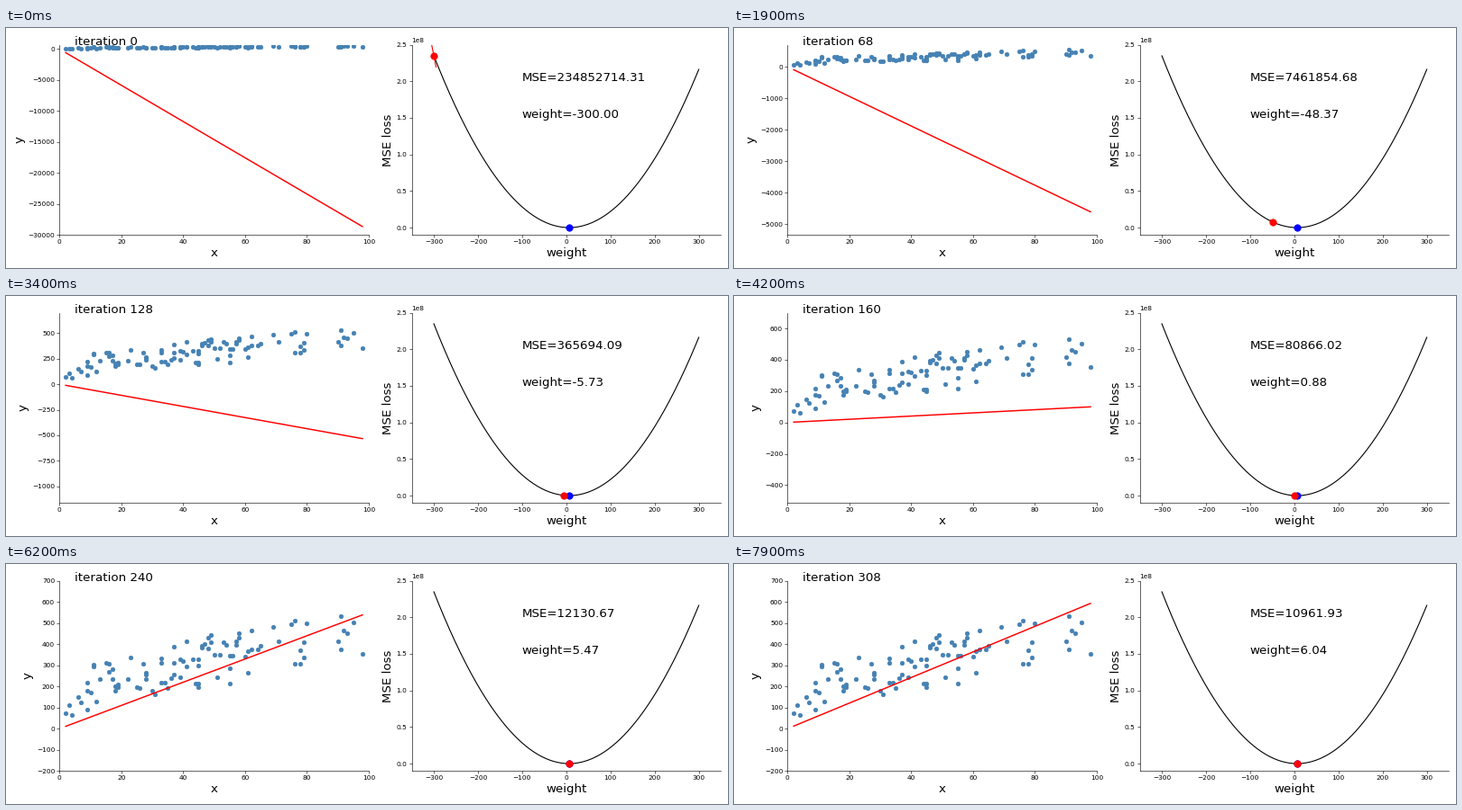
A matplotlib script that plays this animation: 800 px wide and 267 px high, repeating every 8000 ms.

```python
import numpy as np
import matplotlib.pyplot as plt
from matplotlib.animation import FuncAnimation

W, H = 800, 267
DPI = 160 / 3
FONT = 18

# Least-squares loss for y = w * x: MSE = MEAN_X2 * (w - BEST)^2 + MIN_LOSS
MEAN_X2 = 2505.27
BEST = 1545361 / 250527
MIN_LOSS = 10923.63
RATE = 5e-6
START = -300

# First x of each run of consecutive x values, then the y value(s) at each x.
RUNS = {
    2: [74, 110, 64],
    6: [150, 122],
    9: [(217, 178, 90), 170, (304, 295), 128, 234],
    15: [311, (306, 270), (283, 233), (200, 178), (210, 198)],
    22: [234, 336],
    25: [198, 193, 306, (265, 256, 236)],
    30: [178, 162],
    33: [(334, 313, 218), 218, 194, 239, (386, 311, 256)],
    39: [(327, 243), 321, (415, 296)],
    43: [330, 212, (330, 300, 212, 197), (383, 394), 402, (429, 378),
         (444, 411), 349, 245, 349, 411, 395, (347, 285, 214), 347,
         (413, 397), (451, 430)],
    60: [343, (366, 264), (464, 377)],
    64: [377, 394],
    69: [482],
    71: [413],
    75: [495, (513, 308)],
    78: [(370, 306), (410, 336), 498],
    90: [415, (533, 377), 463, 452],
    95: [504],
    98: [353],
}
points = np.array([(first + i, y)
                   for first, column in RUNS.items()
                   for i, ys in enumerate(column)
                   for y in np.atleast_1d(ys)])

ITERATIONS = [0, 1, 2, *range(4, 309, 4)]


def weight_at(step):
    return BEST + (START - BEST) * (1 - 2 * RATE * MEAN_X2) ** step


def loss(w):
    return MEAN_X2 * (w - BEST) ** 2 + MIN_LOSS


def make_axes(left, xlabel, ylabel):
    ax = fig.add_axes([left / W, 1 - 230.2 / H, 342.5 / W, 211.6 / H])
    ax.spines[["top", "right"]].set_visible(False)
    ax.set_xlabel(xlabel, fontsize=FONT)
    ax.set_ylabel(ylabel, fontsize=FONT)
    return ax


fig = plt.figure(figsize=(W / DPI + 1e-7, H / DPI + 1e-7), dpi=DPI)

data_ax = make_axes(59.3, "x", "y")
data_ax.set_xlim(0, 100)
data_ax.scatter(*points.T, color="steelblue")
fit_line, = data_ax.plot([], [], color="red", lw=2)
title = data_ax.text(5, 700, "", fontsize=FONT)

loss_ax = make_axes(449.6, "weight", "MSE loss")
loss_ax.set_xlim(-350, 350)
loss_ax.set_ylim(-1e7, 2.5e8)
weights = np.linspace(-300, 300, 200)
loss_ax.plot(weights, loss(weights), color="black")
loss_ax.plot(BEST, loss(BEST), "o", color="blue", ms=10)
tangent, = loss_ax.plot([], [], color="red")
dot, = loss_ax.plot([], [], "o", color="red", ms=10)
loss_text = loss_ax.text(-100, 2e8, "", fontsize=FONT)
weight_text = loss_ax.text(-100, 1.5e8, "", fontsize=FONT)


def update(frame):
    step = ITERATIONS[frame]
    w, mse = weight_at(step), loss(weight_at(step))

    ends = np.array([2, 98])
    fit_line.set_data(ends, weight_at(step + 1) * ends)
    data_ax.set_ylim(min(-200, 98 * w - 600), 700)
    title.set_text(f"iteration {step}")

    reach = np.array([-5, 5])
    tangent.set_data(w + reach, mse + 4 * MEAN_X2 * (w - BEST) * reach)
    dot.set_data([w], [mse])
    loss_text.set_text(f"MSE={mse:.2f}")
    weight_text.set_text(f"weight={w:.2f}")


anim = FuncAnimation(fig, update, frames=len(ITERATIONS), interval=100,
                     init_func=lambda: update(0), repeat=True, repeat_delay=0)
plt.show()
```
